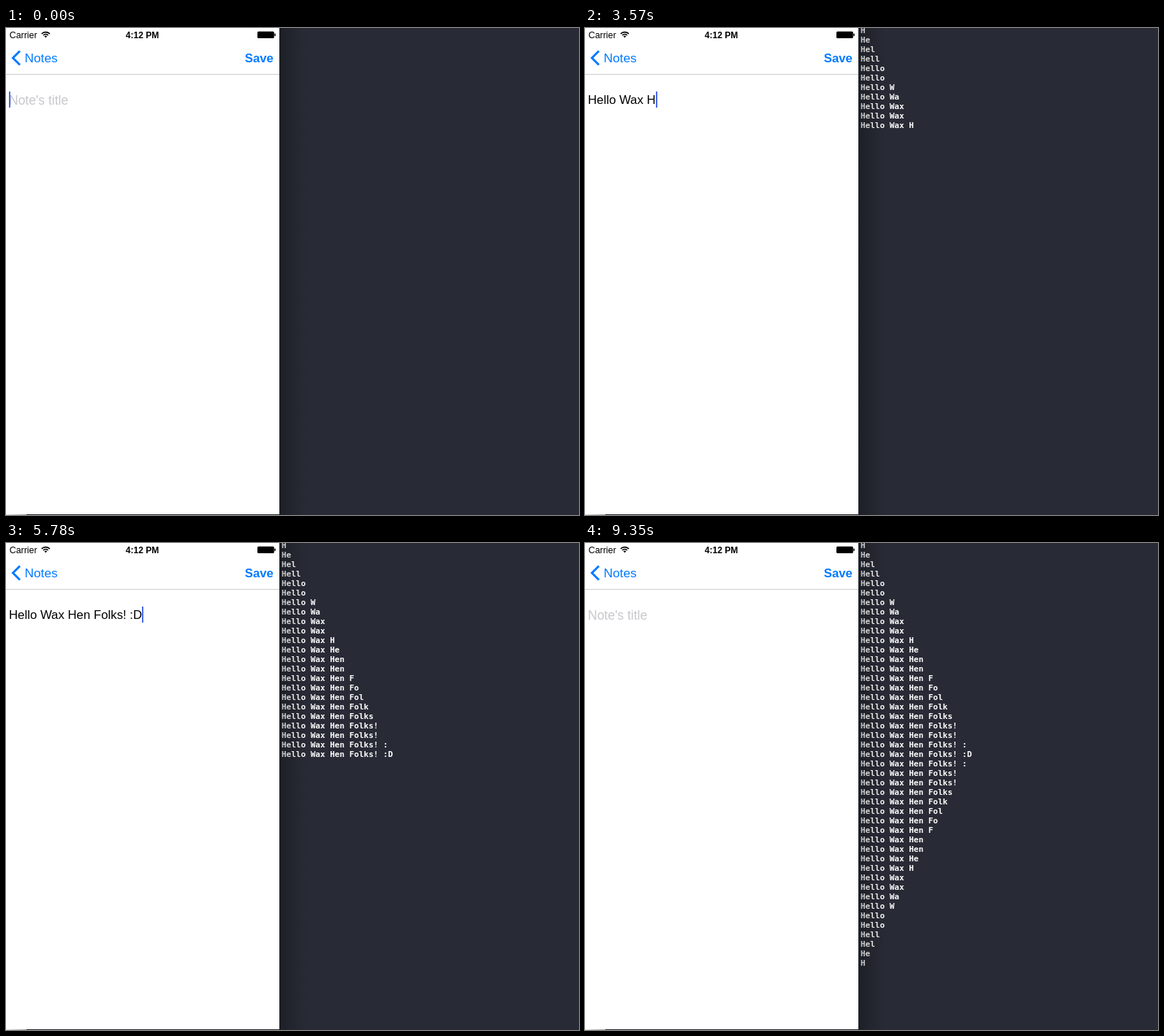
Recreate the animation shown at these times as an HTML page with a canvas. Size 784 px wide and 667 px high, loop 9.69 s.

```html
<!DOCTYPE html>
<html lang="en">
<head>
<meta charset="utf-8">
<title>Note editor with live log</title>
<style>
html, body { margin: 0; width: 100%; height: 100%; overflow: hidden; background: #282b35; }
canvas { display: block; }
</style>
</head>
<body>
<canvas id="stage" width="784" height="667"></canvas>
<script>
const ctx = document.getElementById('stage').getContext('2d');
const W = 784, H = 667, PHONE = 374;
const LOOP = 9690, TICK = 170;
const BLUE = '#007aff';
const SANS = '"Liberation Sans", Arial, sans-serif';
const MONO = '"DejaVu Sans Mono", monospace';
const NOTE = 'Hello Wax Hen Folks! :D';

// Bursts of key presses: start ms, first log length, lines per tick, ticks
const BURSTS = [
  [1700, 2, 1, 7], [3230, 9, 1, 4], [4080, 13, 1, 1], [4420, 14, 1, 7],
  [5610, 22, 1, 2], [6290, 24, 1, 3], [6970, 28, 2, 7], [8160, 42, 2, 3]
];
// Caret opacity changes: start ms, opacity
const BLINKS = [
  [0, 1], [340, .5], [510, 0], [680, .5], [850, 1], [1190, .5],
  [1360, 0], [1700, 1], [9180, .5], [9350, 0]
];

function logLength(t) {
  let n = 0;
  for (const [start, first, rate, ticks] of BURSTS) {
    if (t < start) break;
    n = first + rate * Math.min(ticks - 1, Math.floor((t - start) / TICK));
  }
  return n;
}

function caretAlpha(t) {
  let alpha = 1;
  for (const [start, a] of BLINKS) if (t >= start) alpha = a;
  return alpha;
}

// Text after the n-th key press: typed out, then deleted again
function textAt(n) {
  const len = n <= NOTE.length ? n : 2 * NOTE.length - n;
  return NOTE.slice(0, len);
}

function box(x, y, w, h, color) {
  ctx.fillStyle = color;
  ctx.fillRect(x, y, w, h);
}

function label(str, x, y, font, color) {
  ctx.font = font;
  ctx.fillStyle = color;
  ctx.fillText(str, x, y);
}

function gradient(x0, x1, ...stops) {
  const g = ctx.createLinearGradient(x0, 0, x1, 0);
  for (const [at, color] of stops) g.addColorStop(at, color);
  return g;
}

function drawWifi(x, y) {
  ctx.strokeStyle = ctx.fillStyle = '#000';
  ctx.lineWidth = 1.6;
  for (const r of [4.6, 7.6]) {
    ctx.beginPath();
    ctx.arc(x, y, r, -Math.PI * .76, -Math.PI * .24);
    ctx.stroke();
  }
  ctx.beginPath();
  ctx.moveTo(x, y);
  ctx.arc(x, y, 2.6, -Math.PI * .76, -Math.PI * .24);
  ctx.fill();
}

function drawBattery() {
  ctx.fillStyle = '#000';
  ctx.beginPath();
  ctx.roundRect(344, 4.7, 22.8, 9.3, 1.5);
  ctx.fill();
  ctx.beginPath();
  ctx.roundRect(367.3, 7.6, 1.5, 3.6, .7);
  ctx.fill();
}

function drawBars() {
  label('Carrier', 4.7, 14, '12.4px ' + SANS, '#000');
  drawWifi(54.3, 13.2);
  label('4:12 PM', 163.8, 14, 'bold 12px ' + SANS, '#000');
  drawBattery();

  ctx.strokeStyle = BLUE;
  ctx.lineWidth = 3;
  ctx.beginPath();
  ctx.moveTo(19, 31.5);
  ctx.lineTo(9.5, 41);
  ctx.lineTo(19, 50.5);
  ctx.stroke();
  label('Notes', 25.5, 47, '17.3px ' + SANS, BLUE);
  label('Save', 326.7, 47, 'bold 16.8px ' + SANS, BLUE);
  box(0, 63, PHONE, 1, '#cdcdcd');
}

function drawField(text, alpha) {
  if (text) label(text, 4, 104, '16.8px ' + SANS, '#000');
  else label("Note's title", 4, 104.5, '17.5px ' + SANS, '#c7c7cd');
  const x = text ? Math.round(4 + ctx.measureText(text).width) : 4;
  ctx.globalAlpha = alpha;
  box(x, 87, 2, 22, '#486aec');
  ctx.globalAlpha = 1;
}

function drawLog(n) {
  for (let i = 1; i <= n; i++) {
    label(textAt(i), 377, 7 + 13 * (i - 1), 'bold 11px ' + MONO, '#fff');
  }
  // The phone window casts its shadow over the log
  box(PHONE, 0, 38, H, gradient(PHONE, PHONE + 38,
    [0, 'rgba(0,0,0,.28)'], [.45, 'rgba(0,0,0,.13)'], [1, 'rgba(0,0,0,0)']));
}

function draw(t) {
  const n = logLength(t);
  box(0, 0, W, H, '#282b35');
  drawLog(n);
  box(0, 0, PHONE, H, '#fff');
  box(0, H - 1, PHONE, 1, '#1f2129');
  box(0, H - 1, 28, 1, gradient(0, 28, [0, '#e4e4e4'], [1, '#9a9a9a']));
  drawBars();
  drawField(textAt(n), caretAlpha(t));
}

function frame() {
  draw(performance.now() % LOOP);
  requestAnimationFrame(frame);
}
frame();
</script>
</body>
</html>
```
